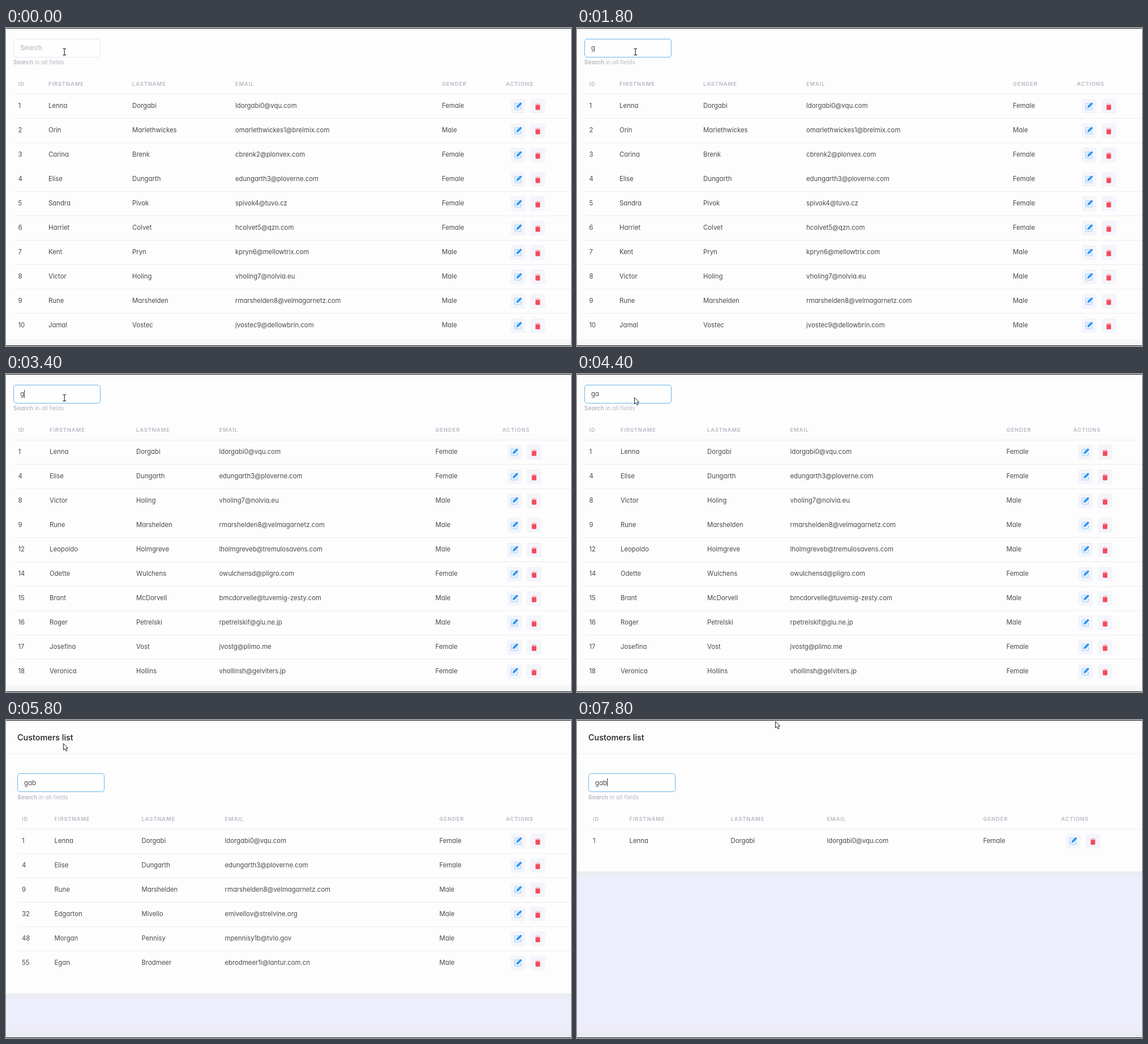
An HTML page for the animation above (8 s loop, 998 by 561 pixels).

```html
<!DOCTYPE html>
<html lang="en">
<head>
<meta charset="utf-8">
<title>Customers list</title>
<style>
  html, body { margin: 0; width: 100%; height: 100%; overflow: hidden; background: #fdfdfd; }
  svg { display: block; width: 998px; height: 561px; }
  text { font-family: Inter, sans-serif; font-size: 11.35px; font-feature-settings: "cv11"; fill: #4b474e; white-space: pre; }
  .head { font-size: 9.4px; font-weight: 600; letter-spacing: .9px; fill: #b7b7c4; }
  .hint { font-size: 10.2px; fill: #b7b7c4; }
  .hint tspan { font-weight: 600; }
  .title { font-size: 14.4px; font-weight: 500; fill: #1c1c22; }
  .empty { font-weight: 500; fill: #b9b9c5; }
</style>
</head>
<body>
<svg viewBox="0 0 998 561">
  <defs>
    <linearGradient id="foot" x1="0" y1="0" x2="0" y2="1">
      <stop offset="0" stop-color="#ededf6"/>
      <stop offset="1" stop-color="#e9eaef"/>
    </linearGradient>
    <g id="edit">
      <rect x="-13" y="-13" width="26" height="26" rx="4" fill="#f4f5fb"/>
      <path d="M1-5.5H-4.5Q-6-5.5-6-4V4.5Q-6 6-4.5 6H4Q5.5 6 5.5 4.5V0" fill="#e4f1fe" stroke="#a5d2fb" stroke-width="1.2"/>
      <path d="M-3 3L-2.3-.4L3.6-6.2Q4.6-7 5.6-6.1L6.2-5.5Q7.1-4.5 6.2-3.6L.4 2.2Z" fill="#3094f0"/>
    </g>
    <g id="trash">
      <rect x="-13" y="-13" width="26" height="26" rx="4" fill="#f4f5fb"/>
      <path d="M-4.5-3.5H4.5M-1.6-4.8H1.6" stroke="#f9a9b2" stroke-width="1.1"/>
      <path d="M-4-2.3H4V5.2Q4 6.4 2.8 6.4H-2.8Q-4 6.4-4 5.2Z" fill="#f34a5d"/>
    </g>
  </defs>
  <g id="page"></g>
  <rect id="caret" width="1" height="14" fill="#333"/>
  <path id="beam" d="M100.5 36.5H102.2L103.2 37.3L104.2 36.5H106M103.2 37.3V47M100.5 47.6H102.2L103.2 46.8L104.2 47.6H106" fill="none" stroke="#222" stroke-width="1.1"/>
  <path id="arrow" d="M.5.5V12L3.1 9.6L5 13.8L7 12.9L5.2 8.8H8.6Z" fill="#fff" stroke="#26262c" stroke-width="1"/>
  <path d="M0 .5H998M0 560.5H998" stroke="#111"/>
</svg>
<script>
const LOOP = 8000;
const $ = id => document.getElementById(id);

// id, first name, last name, mail host, gender
const people = [
  [1, 'Lenna', 'Dorgabi', 'vqu.com', 'F'],
  [2, 'Orin', 'Marlethwickes', 'brelmix.com', 'M'],
  [3, 'Carina', 'Brenk', 'plonvex.com', 'F'],
  [4, 'Elise', 'Dungarth', 'ploverne.com', 'F'],
  [5, 'Sandra', 'Pivok', 'tuvo.cz', 'F'],
  [6, 'Harriet', 'Colvet', 'qzn.com', 'F'],
  [7, 'Kent', 'Pryn', 'mellowtrix.com', 'M'],
  [8, 'Victor', 'Holing', 'nolvia.eu', 'M'],
  [9, 'Rune', 'Marshelden', 'velmagarnetz.com', 'M'],
  [10, 'Jamal', 'Vostec', 'dellowbrin.com', 'M'],
  [12, 'Leopoldo', 'Holmgreve', 'tremulosavens.com', 'M'],
  [14, 'Odette', 'Wulchens', 'pligro.com', 'F'],
  [15, 'Brant', 'McDorvell', 'tuvemig-zesty.com', 'M'],
  [16, 'Roger', 'Petrelski', 'giu.ne.jp', 'M'],
  [17, 'Josefina', 'Vost', 'plimo.me', 'F'],
  [18, 'Veronica', 'Hollins', 'gelviters.jp', 'F'],
  [32, 'Edgarton', 'Mivello', 'strelvine.org', 'M'],
  [48, 'Morgan', 'Pennisy', 'tvlo.gov', 'M'],
  [55, 'Egan', 'Brodmeer', 'lantur.com.cn', 'M']
].map(([id, first, last, host, sex]) => [
  id, first, last,
  (first[0] + last).toLowerCase() + (id - 1).toString(36) + '@' + host,
  sex === 'F' ? 'Female' : 'Male'
]);

const heads = ['ID', 'FIRSTNAME', 'LASTNAME', 'EMAIL', 'GENDER', 'ACTIONS'];
const columns = {
  '': [21.5, 75, 223, 405, 770, 883],
  g: [21.5, 77, 230, 376.5, 758.5, 876.5],
  ga: [28, 85.5, 239.5, 386.5, 765.5, 883],
  gab: [28, 92.5, 271.5, 441.5, 717.5, 855]
};

// [start, value] steps
const typed = [[0, ''], [1800, 'g'], [3800, 'ga'], [5800, 'gab']];
const filters = [[0, ''], [2000, 'g'], [4600, 'ga'], [6000, 'gab']];
const blinks = [[0, 0], [200, 1], [800, 0], [1200, 1], [1800, 0], [2200, 1], [2800, 0], [3400, 1],
  [4000, 0], [4600, 1], [5200, 0], [6600, 1], [7200, 0], [7800, 1]];
const moves = [[0, [101, 41]], [7200, [125, 35]], [7600, [240, 17]], [7800, [350, 2]]];
const at = (steps, t) => steps.filter(s => s[0] <= t).pop()[1];

const text = (x, y, str, cls = '') => `<text x="${x}" y="${y}" class="${cls}">${str}</text>`;
const rect = (x, y, w, h, fill, more = '') => `<rect x="${x}" y="${y}" width="${w}" height="${h}" fill="${fill}" ${more}/>`;
const line = (x, y, color) => `<path d="M${x} ${y}H998" stroke="${color}"/>`;
const use = (id, x, y) => `<use href="#${id}" x="${x}" y="${y}"/>`;

function drawPage(word, filter, focus) {
  const short = filter.length > 1;
  const left = short ? 20 : 13;
  const dy = short ? 75.5 : 0;
  const cols = columns[filter];
  const rows = people.filter(p => p.join(' ').toLowerCase().includes(filter)).slice(0, 10);
  let out = rect(0, 0, 998, 561, '#fdfdfd');

  if (short) {
    const end = 224 + 43 * rows.length;
    out += text(20, 36, 'Customers list', 'title') + line(0, 59.5, '#efeff2');
    out += rect(0, end, 998, 561 - end, '#eeedfb') + rect(0, end, 998, 9, '#ecedf3');
    out += rect(0, 548, 998, 12, 'url(#foot)');
  } else {
    out += rect(0, 549, 998, 11, '#f7f7f9');
  }

  out += rect(left + .5, Math.floor(19 + dy) + .5, 153, 32, '#fefefe',
    `rx="4.5" stroke="${focus ? '#68b5ec' : '#e6e7ec'}"`);
  out += text(left + 12, (word ? 39 : 38.5) + dy, word || 'Search', word ? 'word' : 'empty');
  out += text(left, 64 + dy, '<tspan>Search</tspan> in all fields', 'hint');
  heads.forEach((h, i) => out += text(cols[i], 102 + dy, h, 'head'));

  rows.forEach((row, r) => {
    const y = 137 + dy + 43 * r;
    // the fourth rule of the long table is not visible
    if (short || r !== 3) out += line(left, Math.round(116 + dy) + 43 * r + .5, '#ededf1');
    row.forEach((cell, i) => out += text(cols[i], y + 4, cell));
    out += use('edit', cols[5] + 21.5, y + 1) + use('trash', cols[5] + 56.3, y + 1);
  });
  $('page').innerHTML = out;

  const shown = document.querySelector('.word');
  $('caret').setAttribute('x', Math.round(left + 12 + (shown ? shown.getComputedTextLength() : 0)));
  $('caret').setAttribute('y', Math.floor(28 + dy));
}

let last;
function render(t) {
  const word = at(typed, t), filter = at(filters, t), focus = t >= 200;
  const key = [word, filter, focus].join();
  if (key !== last) drawPage(word, filter, focus);
  last = key;

  const arrow = t >= 4400;
  $('caret').style.display = at(blinks, t) ? '' : 'none';
  $('beam').style.display = arrow ? 'none' : '';
  $('arrow').style.display = arrow ? '' : 'none';
  $('arrow').setAttribute('transform', `translate(${at(moves, t)})`);
}

const start = performance.now();
function tick() {
  render((performance.now() - start) % LOOP);
  requestAnimationFrame(tick);
}
tick();
</script>
</body>
</html>
```
